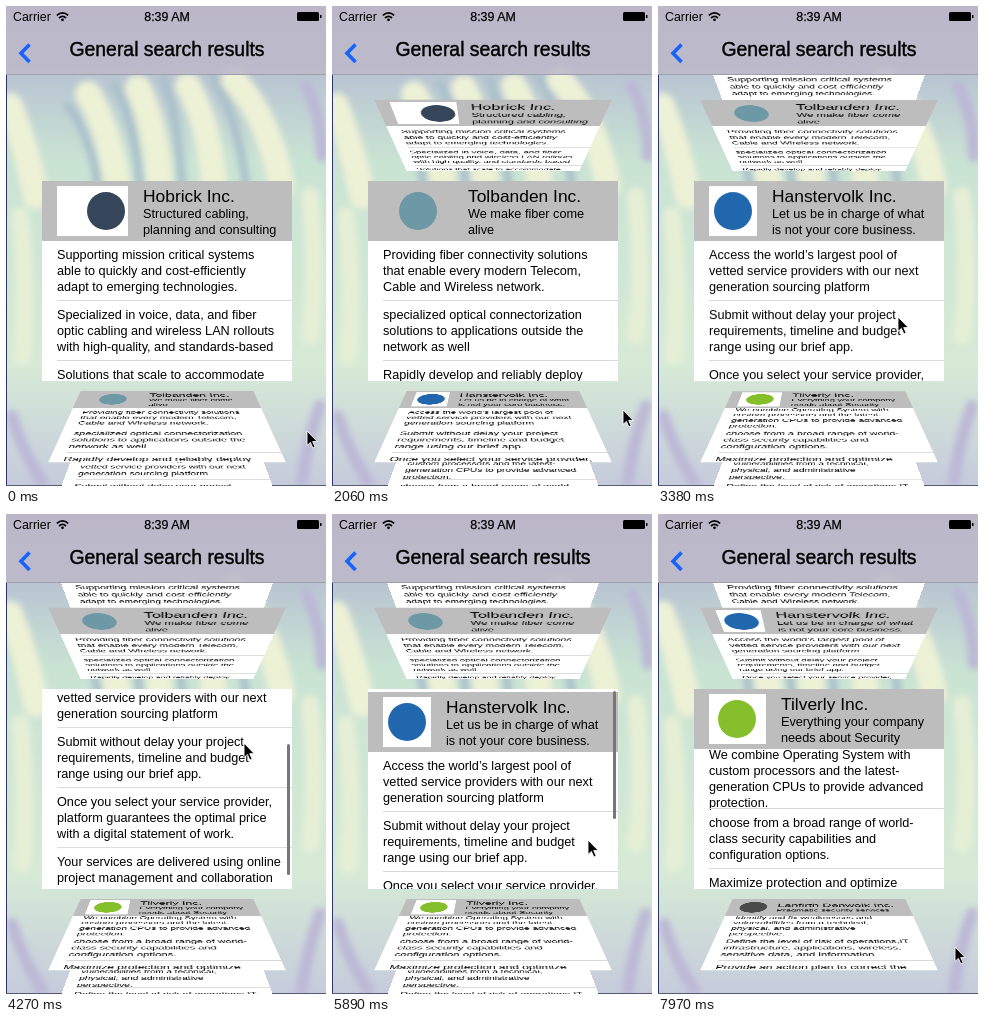
Recreate the animation shown at these times as an HTML page. Size 320 by 480 pixels, loop 8 s.

```html
<!DOCTYPE html>
<html lang="en">
<head>
<meta charset="utf-8">
<title>General search results</title>
<style>
html, body { margin: 0; width: 100%; height: 100%; overflow: hidden; }
body { position: relative; background: #d3e8d6; font: 12.7px/16px "Liberation Sans", Arial, sans-serif; color: #000; white-space: nowrap; }
body > * { position: absolute; }
#back, #top { left: 0; top: 0; }
#deck { left: 0; top: 69px; width: 320px; height: 411px; overflow: hidden; perspective: 500px; perspective-origin: 161px 206px; }
.card { position: absolute; left: 36px; top: 106px; width: 250px; height: 200px; overflow: hidden; background: #fff; will-change: transform; }
.head { position: relative; height: 58px; padding-top: 2px; background: #bdbdbd; display: flex; flex-direction: column; justify-content: center; }
.head b { font-weight: 400; font-size: 17.4px; line-height: 20px; }
.logo { position: absolute; left: 15px; top: 5px; height: 50px; }
.logo i { position: absolute; top: 6px; width: 38px; height: 38px; border-radius: 50%; }
.row { position: relative; height: 60px; padding-left: 15px; display: flex; flex-direction: column; justify-content: center; }
.row::after { content: ""; position: absolute; left: 15px; right: 0; bottom: 0; height: 1px; background: #d9d9dc; }
.bar { position: absolute; left: 244.5px; width: 3px; border-radius: 2px; background: #777; }
#arrow { left: 0; top: 0; }
</style>
</head>
<body>
<svg id="back" width="320" height="480">
  <defs>
    <filter id="soft" x="-20%" y="-20%" width="140%" height="140%"><feGaussianBlur stdDeviation="3"/></filter>
    <linearGradient id="base" x2="0" y2="1">
      <stop stop-color="#aaa5c6"/><stop offset=".15" stop-color="#b9c6d2"/><stop offset=".32" stop-color="#c9e3d3"/>
      <stop offset=".75" stop-color="#d6ead6"/><stop offset="1" stop-color="#c6cbdc"/>
    </linearGradient>
  </defs>
  <rect width="320" height="480" fill="url(#base)"/>
  <g filter="url(#soft)" fill="none" stroke-linecap="round">
    <g stroke="#a9bfcb" stroke-width="8">
      <path d="M62 100Q85 130 92 180M108 78Q128 110 134 180M158 74Q172 110 176 180M206 70Q232 110 240 180"/>
    </g>
    <g stroke="#edf1d6" stroke-width="26">
      <path d="M82 88Q102 120 112 180M132 82Q150 120 154 180M182 80Q204 120 208 180M228 74Q262 110 276 180M4 100Q20 140 30 190"/>
    </g>
    <g stroke="#e6efd6" stroke-width="18"><path d="M14 210Q22 290 16 350M304 190Q312 270 304 330"/></g>
    <path stroke="#bcb8d6" stroke-width="12" d="M300 80Q316 110 316 150M6 410Q14 440 36 476M314 400Q300 440 296 476"/>
  </g>
  <path d="M.5 69V480" stroke="#2b356c"/><path d="M0 479.5H320" stroke="#555a70"/>
</svg>

<div id="deck"></div>

<svg id="top" width="320" height="69">
  <rect width="320" height="69" fill="#bebaca" fill-opacity=".88"/>
  <path d="M0 68.5H320" stroke="#a19dae"/>
  <path d="M23.5 38.5L15 47.2 23.5 56" fill="none" stroke="#1763ff" stroke-width="3.6"/>
  <g fill="none" stroke="#000" stroke-width="1.7">
    <path d="M50.8 9.4Q56.5 4.4 62.2 9.4M53 12Q56.5 8.8 60 12"/>
  </g>
  <circle cx="56.5" cy="13.8" r="1.4"/>
  <rect x="291" y="6" width="22" height="9" rx="1.5"/><path d="M314 9h1.5v3H314z"/>
  <text x="7" y="14.6" font-size="12.4">Carrier</text>
  <g stroke="#000" text-anchor="middle">
    <text x="161" y="14.6" font-size="12.4" stroke-width=".25">8:39 AM</text>
    <text x="161" y="49.5" font-size="19.4" stroke-width=".4">General search results</text>
  </g>
</svg>

<svg id="arrow" width="14" height="20">
  <path d="M1 1v14.5l3.4-3.1 2.5 5.6 2.3-1-2.5-5.4h4.6z" stroke="#fff" stroke-width=".9"/>
</svg>

<script>
// logo: [box width, box colour, disc left, disc colour]; x: left edge of the heading
const cards = [
  { name: "Hobrick Inc.", sub: "Structured cabling,/planning and consulting", x: 101, logo: [71, "#fff", 30, "#36465a"],
    rows: ["Supporting mission critical systems/able to quickly and cost-efficiently/adapt to emerging technologies.",
      "Specialized in voice, data, and fiber/optic cabling and wireless LAN rollouts/with high-quality, and standards-based",
      "Solutions that scale to accommodate/growth and change/over time."] },
  { name: "Tolbanden Inc.", sub: "We make fiber come/alive", x: 100, logo: [70, "none", 16, "#6d98a6"],
    rows: ["Providing fiber connectivity solutions/that enable every modern Telecom,/Cable and Wireless network.",
      "specialized optical connectorization/solutions to applications outside the/network as well",
      "Rapidly develop and reliably deploy/new fiber links/on any site."] },
  { name: "Hanstervolk Inc.", sub: "Let us be in charge of what/is not your core business.", x: 78, logo: [48, "#fff", 5, "#2167ad"],
    rows: ["Access the world’s largest pool of/vetted service providers with our next/generation sourcing platform",
      "Submit without delay your project/requirements, timeline and budget/range using our brief app.",
      "Once you select your service provider,/platform guarantees the optimal price/with a digital statement of work.",
      "Your services are delivered using online/project management and collaboration/tools."] },
  { name: "Tilverly Inc.", sub: "Everything your company/needs about Security", x: 87, logo: [57, "#fff", 9, "#86bf2c"],
    rows: ["We combine Operating System with/custom processors and the latest-/generation CPUs to provide advanced/protection.",
      "choose from a broad range of world-/class security capabilities and/configuration options.",
      "Maximize protection and optimize/performance across/the network."] },
  { name: "Lanfirth Denwolk Inc.", sub: "Pragmatic security services", x: 67, logo: [38, "none", 0, "#4a4a4a"],
    rows: ["Identify and fix weaknesses and/vulnerabilities from a technical,/physical, and administrative/perspective.",
      "Define the level of risk of operations,IT/infrastructure, applications, wireless,/sensitive data, and information",
      "Provide an action plan to correct the/issues found/in the review."] }
];

const lines = s => s.split("/").map(l => `<span>${l}</span>`).join("");
const deck = document.getElementById("deck"), arrow = document.getElementById("arrow");

const views = cards.map(({ name, sub, x, logo: [w, box, left, disc], rows }) => {
  const el = document.createElement("div");
  el.className = "card";
  el.innerHTML = `<div class="list"><div class="head" style="padding-left:${x}px">
    <div class="logo" style="width:${w}px;background:${box}"><i style="left:${left}px;background:${disc}"></i></div>
    <b>${name}</b>${lines(sub)}</div>${rows.map(r => `<div class="row">${lines(r)}</div>`).join("")}</div>`;
  return deck.appendChild(el);
});
const list = views[2].firstChild;
const bar = document.createElement("div");
bar.className = "bar";
views[2].append(bar);

const LOOP = 8000, STEP = 147.5, SIZE = 250, TILT = 0.9;
const flicks = [[290, 1320], [2060, 1320], [6718, 657]]; // start, duration
const listPath = [[3830, 0], [4268, 81], [4560, 99], [4990, 96], [5450, 0], [5600, -14], [5890, -3], [6040, 0]];
const arrowPath = [
  [290, 301, 425], [600, 303, 330], [900, 303, 250], [1320, 300, 340], [1620, 291, 404], [2060, 291, 404],
  [2645, 291, 294], [2850, 288, 60], [3090, 240, 311], [3830, 240, 311], [4268, 238, 229], [4560, 238, 212],
  [4990, 240, 212], [5500, 254, 324], [5890, 256, 326], [6480, 304, 440], [6720, 304, 430], [7070, 300, 281],
  [7250, 303, 8], [7500, 300, 250], [7955, 297, 433]
];

const clamp = u => Math.max(0, Math.min(1, u));
const easeOut = u => 1 - (1 - u) ** 3;
const easeInOut = u => u < 0.5 ? 4 * u ** 3 : 1 - 4 * (1 - u) ** 3;

// Linear path through [time, ...values]
function along(path, t) {
  if (t <= path[0][0]) return path[0].slice(1);
  const i = path.findIndex(p => p[0] > t);
  if (i < 0) return path.at(-1).slice(1);
  const a = path[i - 1], b = path[i], u = (t - a[0]) / (b[0] - a[0]);
  return a.slice(1).map((v, j) => v + (b[j + 1] - v) * u);
}

function draw(t) {
  let pos = 0, turn = 0;
  for (const [start, time] of flicks) {
    pos += easeOut(clamp((t - start) / time));
    const half = start + 0.2063 * time; // the middle card changes here
    if (t >= half) turn = 1 - easeInOut(clamp((t - half) / 400));
  }
  views.forEach((el, i) => {
    const d = i - pos;
    const c = d > 0.5 ? 1 : d > -0.5 ? turn : d > -1.5 ? turn - 1 : -1;
    const y = (c * 0.5 * TILT + d * 0.25) * SIZE, z = -Math.abs(c) * SIZE / 2;
    el.style.transform = c || d ? `translate3d(0,${y}px,${z}px) rotateX(${c * 90 * TILT}deg)` : "none";
    el.style.zIndex = 100 - Math.round(Math.abs(d) * 20);
  });

  const [scroll] = along(listPath, t);
  list.style.transform = `translateY(${-scroll}px)`;
  bar.style.top = 2 + Math.max(0, scroll) * 0.653 + "px";
  bar.style.height = 130.7 + Math.min(0, scroll) + "px";
  bar.style.opacity = +(t >= 3830 && t < 6100);

  const [x, y] = along(arrowPath, t);
  arrow.style.transform = `translate(${x - 1}px,${y - 1}px)`;
}

const begin = performance.now();
function tick() {
  const t = (performance.now() - begin) % LOOP;
  draw(Math.max(0, Math.floor((t + 10) / STEP) * STEP - 10));
  requestAnimationFrame(tick);
}
tick();
</script>
</body>
</html>
```
